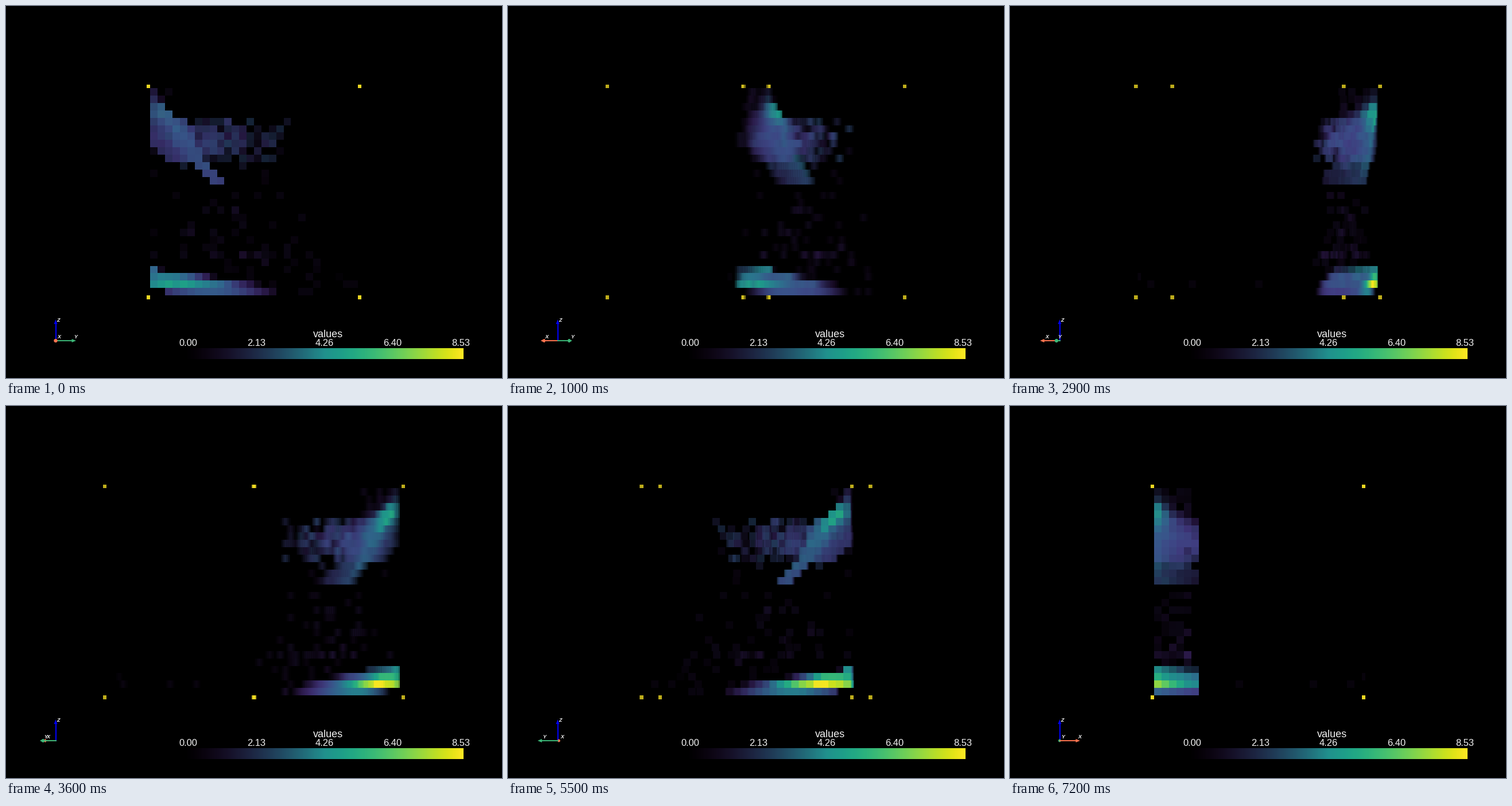
A matplotlib script that plays this animation: 864 by 648 pixels, repeating every 8 s.

```python
import numpy as np
import matplotlib.pyplot as plt
from matplotlib.animation import FuncAnimation
from matplotlib.patches import Ellipse, Polygon

W, H, DPI = 864, 648, 100
N = 30                      # grid points per side
CUBE = 374                  # cube side in pixels
CELL = CUBE / (N - 1)
LEFT, VIEW_W, TOP = 162, 540, 137
VMAX = 8.53
DEPTH = 6                   # cells in x that hold most of the data
STEP = 0.25                 # ray step in cells
UNIT = 3 ** 0.5             # distance at which opacity is reached
VIRIDIS = plt.get_cmap("viridis")


def bell(x, centre, width):
    return np.exp(-((x - centre) / width) ** 2)


def add_wedge(vol, rng):
    """Upper body: a bright diagonal ridge inside a wedge."""
    for row in range(1, 14):
        first = int(np.interp(row, [8, 10, 11, 13], [1, 3, 7, 9.6]))
        last = int(np.interp(row, [1, 4, 6, 9, 13], [1, 3.5, 6.5, 7, 10.4]))
        peak = np.interp(row, [1, 4, 7, 13], [1.6, 5.4, 3.3, 2.6])
        decay = np.interp(row, [3, 7], [.55, .9])
        for y in range(first, last + 1):
            level = 1.9 + (peak - 1.9) * bell(y, .78 * row - .7, 2.2)
            for x in range(1, DEPTH + 1):
                v = level * decay ** (x - 1) * rng.uniform(.88, 1.08)
                if v > .8 and (x < 5 or rng.random() < .7):
                    vol[x, y, row] = v


def add_tail(vol, rng):
    """Noise that thins out to the right of the wedge."""
    for row in range(3, 13):
        for y in range(4, 23):
            thin = min(1, (22 - y) / 16) ** 1.5
            for x in range(1, DEPTH + 1):
                chance = .85 * thin * bell(row, 7.5, 2.2)
                if vol[x, y, row] == 0 and rng.random() < chance:
                    vol[x, y, row] = rng.uniform(.8, 2.5)


def add_base(vol, rng):
    """Floor slab: one bell along y per row."""
    for row, peak, centre, width, first in [(25, 4.4, 1, .8, 1),
                                            (26, 6.1, 2.7, 4.5, 1),
                                            (27, 8.6, 4.2, 7, 1),
                                            (28, 3.7, 8.5, 7.5, 3)]:
        for y in range(first, 18):
            for x in range(1, DEPTH + 1):
                v = peak * bell(y, centre, width) * .89 ** (x - 1)
                if v > .8:
                    vol[x, y, row] = v * rng.uniform(.93, 1.05)


def scatter(vol, rng, count, rows, y_mean, y_spread):
    for _ in range(count):
        x, row = rng.integers(1, DEPTH), rng.integers(*rows)
        y = int(np.clip(rng.normal(y_mean, y_spread), 1, 23))
        vol[x, y, row] = max(vol[x, y, row], rng.uniform(.6, 1.1))


def build_values():
    rng = np.random.default_rng(7)
    vol = np.zeros((N + 1, N + 1, N))      # last x and y index stay empty
    add_wedge(vol, rng)
    add_tail(vol, rng)
    add_base(vol, rng)
    scatter(vol, rng, 18, (1, 6), 1.5, 1)
    scatter(vol, rng, 10, (9, 14), 10, 6)
    scatter(vol, rng, 42, (15, 25), 11, 4.5)
    scatter(vol, rng, 26, (23, 29), 16, 4)
    for x, y, row in [(29, 26, 26), (27, 27, 27), (22, 23, 27), (12, 28, 27)]:
        vol[x, y, row] = .7
    vol = np.minimum(vol, 8.45)
    vol[np.ix_([0, N - 1], [0, N - 1], [0, N - 1])] = VMAX
    return vol


def shade(values):
    """Premultiplied colour and alpha for one ray step."""
    t = values / VMAX
    opacity = np.clip(2 * t, 0, .992)
    alpha = 1 - (1 - opacity) ** (STEP / UNIT)
    rgba = VIRIDIS(t)
    rgba[..., :3] *= alpha[..., None]
    rgba[..., 3] = alpha
    return rgba


VALUES = build_values()
VOXELS = shade(VALUES)
FILLED = VALUES.any(axis=2)
ROWS = np.rint((np.arange(CUBE) + .9) / CELL).astype(int)


def grid_index(p):
    half = (N - 1) / 2
    return np.where(np.abs(p) <= half, np.rint(p + half), N).astype(int)


def render(angle):
    c, s = np.cos(np.radians(angle)), np.sin(np.radians(angle))
    u = (np.arange(VIEW_W) + .5 - VIEW_W / 2) / CELL
    color = np.zeros((VIEW_W, N, 3))
    clear = np.ones((VIEW_W, N, 1))
    for d in np.arange(20.625, -20.7, -STEP):
        ix, iy = grid_index(d * c - u * s), grid_index(u * c + d * s)
        hit = np.nonzero(FILLED[ix, iy])[0]
        if hit.size:
            sample = VOXELS[ix[hit], iy[hit]]
            color[hit] += clear[hit] * sample[..., :3]
            clear[hit] *= 1 - sample[..., 3:]
    pixels = (np.clip(color, 0, 1) * 255).astype(np.uint8)
    return pixels.transpose(1, 0, 2)[ROWS]


VIEWS = {a: render(a) for a in range(0, 271, 5)}

fig = plt.figure(figsize=(W / DPI, H / DPI), dpi=DPI, facecolor="black")
ax = fig.add_axes([0, 0, 1, 1])


def label(x, y, text, px, **style):
    return ax.text(x, y, text, color="#f2f2f2", fontsize=px * 72 / DPI,
                   family="Liberation Sans", ha="center", va="baseline", **style)


view = ax.imshow(VIEWS[0], extent=(LEFT, LEFT + VIEW_W, TOP + CUBE, TOP),
                 interpolation="nearest")

# Colour bar
t = np.linspace(0, 1, 256)
bar = VIRIDIS(t)[:, :3] * np.minimum(2 * t, 1)[:, None]
ax.imshow(bar[None], extent=(312, 797, 615, 596), interpolation="nearest",
          aspect="auto")
label(561, 577, "values", 18)
for i in range(5):
    label(317 + 118.8 * i, 592, f"{VMAX * i / 4:.2f}", 16.5)

# Orientation axes
OX, OY, REACH, NECK = 86.5, 583, 35.5, 28
BOLD = dict(weight="bold", style="italic")
BLUE = "#0000ec"
ax.plot([OX, OX], [OY, OY - 30], color=BLUE, lw=1.6, zorder=3)
ax.add_patch(Polygon([(OX - 3, OY - 29), (OX + 3, OY - 29), (OX, OY - 37)],
                     color=BLUE, lw=0, zorder=3))
label(91, 550, "Z", 9, **BOLD)


class Arrow:
    def __init__(self, name, color):
        self.line, = ax.plot([], [], color=color, lw=1.4)
        self.cone = ax.add_patch(Polygon([(0, 0)] * 3, color=color, lw=0))
        self.base = ax.add_patch(Ellipse((OX, OY), 6, 6, color=color, lw=0))
        self.text = label(0, 579, name, 9, zorder=9, **BOLD)

    def aim(self, across, toward):
        zoom = 1 + .14 * toward             # perspective
        across *= zoom
        neck, tip = OX + NECK * across, OX + REACH * across
        self.line.set_data([OX, neck], [OY, OY])
        self.cone.set_xy([(neck, OY - 3), (neck, OY + 3), (tip, OY)])
        self.base.set_center((neck, OY))
        self.base.set_width(5.6 * zoom * abs(toward))
        self.base.set_height(5.6 * zoom)
        self.text.set_x(92 + 29 * across)
        for part in (self.line, self.cone, self.base):
            part.set_zorder(4 + toward)


arrow_x = Arrow("X", "#ff7450")
arrow_y = Arrow("Y", "#3cb878")

ax.set_xlim(0, W)
ax.set_ylim(H, 0)
ax.set_aspect("auto")
ax.axis("off")


def update(n):
    # Quarter turns of 18 steps, each followed by a pause
    turn, k = divmod(n, 27)
    angle = 90 * turn + 5 * min(k, 18)
    c, s = np.cos(np.radians(angle)), np.sin(np.radians(angle))
    view.set_data(VIEWS[angle])
    arrow_x.aim(-s, c)
    arrow_y.aim(c, s)
    return []


anim = FuncAnimation(fig, update, frames=80, interval=100, repeat=True,
                     repeat_delay=0, blit=False)
plt.show()
```
